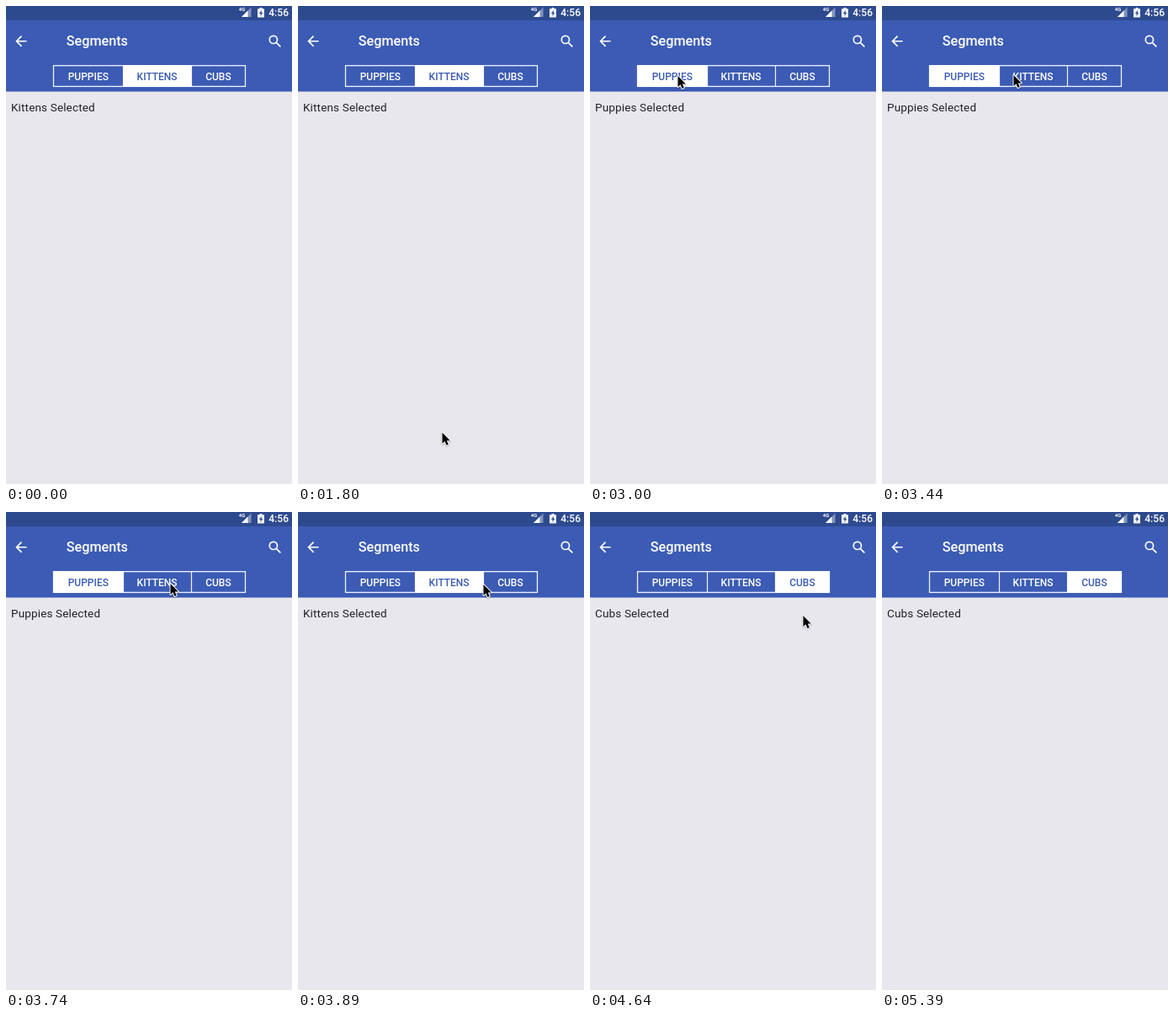
Animation, 340 px wide and 567 px high, one loop 5.49 s. Source, as an HTML page with a canvas:

```html
<!DOCTYPE html>
<html lang="en">
<head>
<meta charset="utf-8">
<title>Segments</title>
<style>
  html, body { margin: 0; width: 100%; height: 100%; overflow: hidden; background: #e8e7ed; }
  canvas { display: block; width: 340px; height: 567px; }
</style>
</head>
<body>
<canvas id="stage"></canvas>
<script>
const W = 340, H = 567, LOOP = 5490;
const BLUE = '#3b5bb4', DARK = '#2e4a8f', PAGE = '#e8e7ed', INK = '#222226';
const FONT = 'Roboto, "Open Sans", sans-serif';

const canvas = document.getElementById('stage');
const ctx = canvas.getContext('2d');
const dpr = window.devicePixelRatio || 1;
canvas.width = W * dpr;
canvas.height = H * dpr;
ctx.scale(dpr, dpr);

const tabs = [
  { name: 'Puppies', x: 56, right: 139.5, mid: 97.8 },
  { name: 'Kittens', x: 139.5, right: 220.5, mid: 179.6 },
  { name: 'Cubs', x: 220.5, right: 285, mid: 252.4 }
];

// The pointer jumps between sampled positions: [time, x, y]
const pointer = [
  [1800, 170, 504], [1950, 163, 144], [2100, 145, 91], [2250, 104, 81],
  [2400, 103, 81], [3140, 106, 81.5], [3290, 147, 80], [3440, 155, 80],
  [3590, 158, 81], [3740, 194, 83], [3890, 219, 84], [4040, 229, 85],
  [4190, 240, 84], [4640, 252, 121], [4790, 269, 390], [4940, 277, 527],
  [5090, 282, 553], [5240, 295, 564], [5390, -50, -50]
];
const selection = [[0, 1], [3000, 0], [3890, 1], [4640, 2]];

const backIcon = new Path2D('M20 11H7.83l5.59-5.59L12 4l-8 8 8 8 1.41-1.41L7.83 13H20z');
const arrow = new Path2D('M0 0V13L3 10.3L5 15L7.3 14L5.3 9.5H9.3Z');
const battery = new Path2D('M301.5 2H304.5V3.3H307V13.5H299V3.3H301.5Z');
const bolt = new Path2D('M303.8 5L301 9H302.6V12L305.2 7.9H303.8Z');

function stepAt(list, t) {
  let hit = null;
  for (const item of list) if (item[0] <= t) hit = item;
  return hit;
}

function box(x, y, w, h, color) {
  ctx.fillStyle = color;
  ctx.fillRect(x, y, w, h);
}

function label(text, x, y, size, weight, color, align = 'left', spacing = 0) {
  ctx.font = `${weight} ${size}px ${FONT}`;
  ctx.textAlign = align;
  ctx.letterSpacing = spacing + 'px';
  ctx.fillStyle = color;
  ctx.fillText(text, x, y);
}

function triangle(x, y, size, color) {
  ctx.fillStyle = color;
  ctx.beginPath();
  ctx.moveTo(x, y);
  ctx.lineTo(x + size, y);
  ctx.lineTo(x + size, y - size);
  ctx.fill();
}

function drawStatus() {
  box(0, 0, W, 17, DARK);
  triangle(280, 13, 11.5, '#8292bd');
  triangle(280, 13, 7.5, '#fff');
  label('4G', 276.8, 6.2, 6, 700, '#fff');
  ctx.fillStyle = '#f2f4fa';
  ctx.fill(battery);
  ctx.fillStyle = DARK;
  ctx.fill(bolt);
  label('4:56', 312.2, 12.2, 12.1, 500, '#fff');
}

function drawToolbar() {
  box(0, 17, W, 84.5, BLUE);
  ctx.save();
  ctx.translate(8, 31.8);
  ctx.scale(0.83, 0.83);
  ctx.fillStyle = '#fff';
  ctx.fill(backIcon);
  ctx.restore();
  label('Segments', 71.8, 47.4, 16.2, 500, '#fff');

  ctx.strokeStyle = '#fff';
  ctx.lineWidth = 1.7;
  ctx.beginPath();
  ctx.arc(317.9, 39.9, 4.6, 0, Math.PI * 2);
  ctx.moveTo(321.3, 43.3);
  ctx.lineTo(326.4, 48.4);
  ctx.stroke();
}

function drawTabs(active) {
  ctx.strokeStyle = '#f0f2fa';
  ctx.lineWidth = 1.3;
  ctx.strokeRect(56.5, 70.7, 228, 24.7);
  for (const tab of tabs.slice(1)) box(tab.x - 0.6, 71, 1.2, 24, '#f0f2fa');
  tabs.forEach((tab, i) => {
    const on = i === active;
    if (on) box(tab.x, 70.2, tab.right - tab.x, 25.7, '#fff');
    label(tab.name.toUpperCase(), tab.mid, 87.8, 12, 500, on ? BLUE : '#fff', 'center');
  });
}

function drawPointer(x, y) {
  ctx.save();
  ctx.translate(x + 1.5, y + 2);
  ctx.lineJoin = 'round';
  ctx.lineWidth = 2;
  ctx.strokeStyle = '#fff';
  ctx.shadowColor = 'rgba(0,0,0,0.35)';
  ctx.shadowBlur = 1.5 * dpr;
  ctx.shadowOffsetY = 0.7 * dpr;
  ctx.stroke(arrow);
  ctx.shadowColor = 'transparent';
  ctx.fillStyle = '#000';
  ctx.fill(arrow);
  ctx.restore();
}

function draw(t) {
  const active = stepAt(selection, t)[1];
  box(0, 0, W, H, PAGE);
  drawStatus();
  drawToolbar();
  drawTabs(active);
  label(tabs[active].name + ' Selected', 6, 124.8, 13.5, 400, INK, 'left', 0.15);
  const at = stepAt(pointer, t);
  if (at) drawPointer(at[1], at[2]);
}

function tick() {
  draw(performance.now() % LOOP);
  requestAnimationFrame(tick);
}
tick();
</script>
</body>
</html>
```
